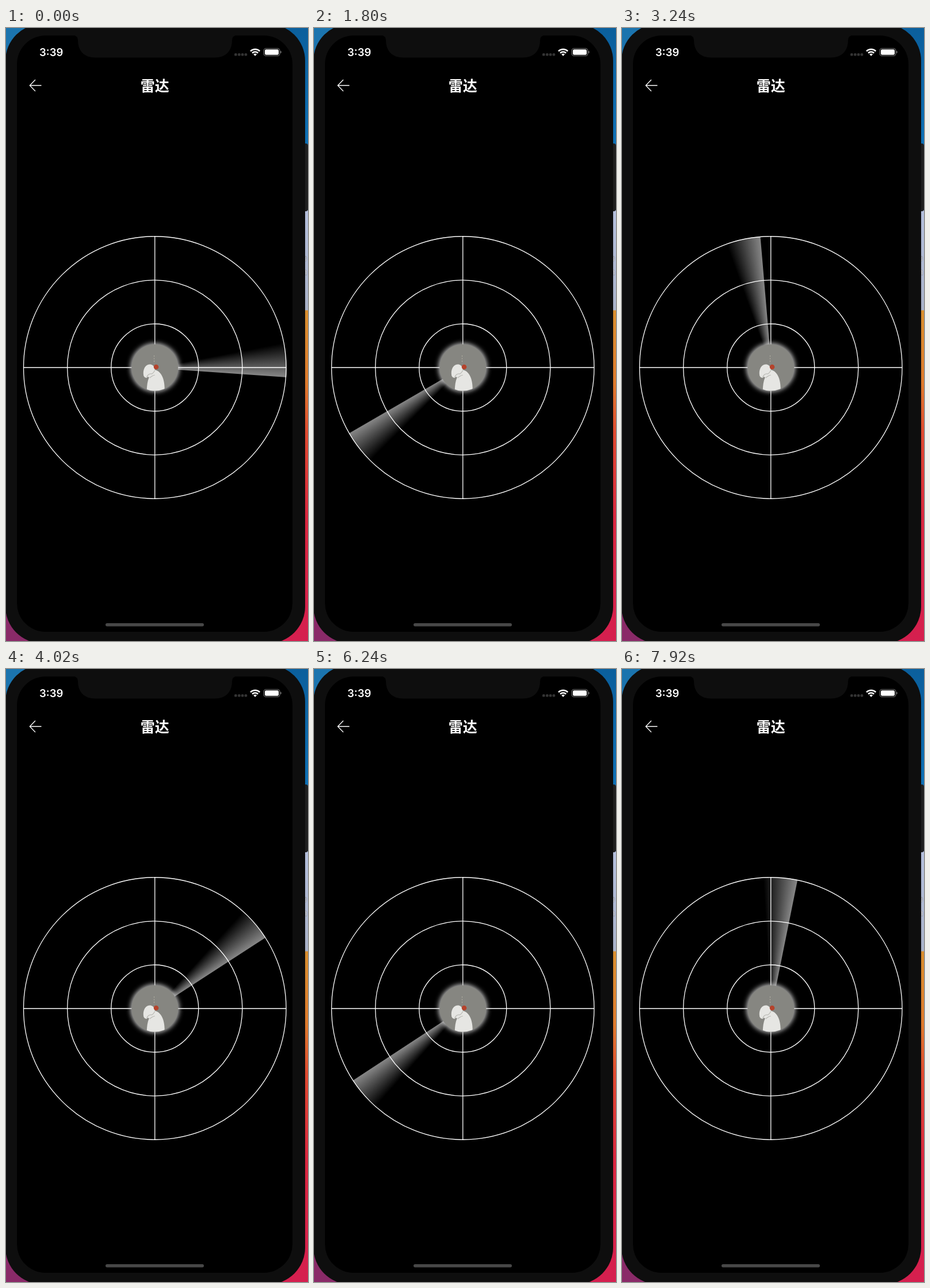
Animation of 525 by 1067 pixels, one loop 7.98 s. Source, as an HTML page:

```html
<!DOCTYPE html>
<html lang="zh-CN">
<head>
<meta charset="utf-8">
<title>雷达</title>
<style>
  html, body { margin: 0; width: 100%; height: 100%; overflow: hidden; background: #000; }
  .stage { position: relative; width: 525px; height: 1067px; overflow: hidden; }
  svg { position: absolute; left: 0; top: 0; }
  .clock { font: 600 18.5px Inter, sans-serif; }
  .title { font: 600 25px "Noto Sans CJK SC", "Noto Sans CJK", sans-serif; }
  .label { font: 500 15px Inter, sans-serif; }
  #beam {
    position: absolute; left: 30.5px; top: 362.75px; width: 456.5px; height: 456.5px;
    border-radius: 50%;
    background: conic-gradient(from 75deg, rgba(255,255,255,0) 0deg, rgba(255,255,255,.52) 15deg,
      rgba(255,255,255,0) 15.2deg, rgba(255,255,255,0) 360deg);
  }
</style>
</head>
<body>
<div class="stage">
  <svg width="525" height="1067" viewBox="0 0 525 1067">
    <defs>
      <linearGradient id="desk" x1="0" y1="0" x2="0" y2="1">
        <stop offset="0" stop-color="#0b5f9c"/>
        <stop offset=".18" stop-color="#0d6fb4"/>
        <stop offset=".297" stop-color="#0d6fb4"/>
        <stop offset=".297" stop-color="#b4bfdc"/>
        <stop offset=".46" stop-color="#a9b2c8"/>
        <stop offset=".461" stop-color="#d98f2f"/>
        <stop offset=".58" stop-color="#de7a2c"/>
        <stop offset=".66" stop-color="#df4a30"/>
        <stop offset=".8" stop-color="#d9263f"/>
        <stop offset="1" stop-color="#d51f4f"/>
      </linearGradient>
    </defs>

    <!-- desktop -->
    <rect width="525" height="1067" fill="url(#desk)"/>
    <rect width="80" height="80" fill="#1b74ae"/>
    <rect y="980" width="90" height="87" fill="#8a2a68"/>
    <g class="label" fill="#f4f4f4" stroke="#6d7284" stroke-width=".6">
      <text x="514.5" y="406">o</text>
      <text x="514.5" y="430">n</text>
    </g>

    <!-- phone -->
    <rect x="514" y="201" width="11" height="118" rx="4" fill="#1f1f1f"/>
    <rect x="-1" y="-7" width="521" height="1078" rx="64" fill="#0e0e0e"/>
    <rect x="19" y="13" width="479" height="1038" rx="50"/>
    <path d="M116 12.5Q125 13 125 21C125 40 136 51.5 155 51.5H363C382 51.5 393 40 393 21Q393 13 402 12.5Z" fill="#0e0e0e"/>
    <rect x="173" y="1036" width="171" height="5.5" rx="2.75" fill="#484848"/>

    <!-- status bar -->
    <text class="clock" x="58" y="49" fill="#fff">3:39</text>
    <g fill="#343434">
      <rect x="397" y="44" width="4.6" height="4.6" rx="1.5"/>
      <rect x="403" y="44" width="4.6" height="4.6" rx="1.5"/>
      <rect x="408.800" y="44" width="4.6" height="4.6" rx="1.5"/>
      <rect x="414.600" y="44" width="4.6" height="4.6" rx="1.5"/>
    </g>
    <g fill="none" stroke="#fff" stroke-width="2.5">
      <path d="M425 40.300A11.500 11.500 0 0 1 441.200 40.300"/>
      <path d="M428 43.700A7.200 7.200 0 0 1 438.200 43.700"/>
    </g>
    <path d="M430.200 45.800A4 4 0 0 1 436 45.800L433.100 48.800Z" fill="#fff"/>
    <rect x="448.200" y="35.500" width="27.600" height="13" rx="3.600" fill="none" stroke="#707070" stroke-width="1.200"/>
    <rect x="450" y="37.200" width="24" height="9.600" rx="2.200" fill="#fff"/>
    <path d="M477 39.800Q478.800 40.400 478.800 42T477 44.200Z" fill="#707070"/>

    <!-- navigation -->
    <path d="M61.500 100H41.500M51 90L41.300 100L51 110" fill="none" stroke="#fff" stroke-width="1.300"/>
    <text class="title" x="258.700" y="109.500" text-anchor="middle" fill="#fff">雷达</text>
  </svg>

  <div id="beam"></div>

  <svg width="525" height="1067" viewBox="0 0 525 1067">
    <defs>
      <filter id="blur" x="-40%" y="-40%" width="180%" height="180%">
        <feGaussianBlur stdDeviation="4"/>
      </filter>
      <clipPath id="face"><circle r="40.500"/></clipPath>
    </defs>
    <g transform="translate(258.750 591)">
      <g fill="none" stroke="#fff" stroke-width="1.300">
        <circle r="76"/>
        <circle r="152.100"/>
        <circle r="228.250"/>
        <path d="M-228.250 0H228.250M0-228.250V228.250"/>
      </g>
      <circle r="42" fill="#d0d0d0" filter="url(#blur)"/>
      <circle r="40.500" fill="#868681"/>
      <g clip-path="url(#face)">
        <path d="M-14 42C-14 32-13 24-10 17Q-13 15-14 18Q-20 18-20 10C-20-1-13-7-6-5Q-1-4 0 4C10 6 18 18 17 42Z" fill="#e6e6e3"/>
        <path d="M-14 17Q-12 10-5 11Q-2 9 0 5M-9 18Q-5 14 0 13" fill="none" stroke="#b9b9b4" stroke-width="1.200"/>
        <circle cx="2.300" cy="-1" r="4.300" fill="#b5432c"/>
        <path d="M-1.200-21V-7" stroke="#b8b3a6" stroke-width="1" stroke-dasharray="2 2.500"/>
      </g>
    </g>
  </svg>
</div>
<script>
  const LOOP = 7980, TICK = 60;
  // [ms, degrees clockwise from the right-hand axis]
  const sweep = [[0, 4], [1020, 86.9], [2520, 208], [4020, 327], [5220, 425.2],
                 [6240, 506.700], [7920, 641.4], [LOOP, 641.4]];
  const keys = sweep.map(([t, deg], i) => {
    const next = sweep[i + 1];
    return {
      offset: t / LOOP,
      transform: `rotate(${deg}deg)`,
      easing: next ? `steps(${(next[0] - t) / TICK}, end)` : 'linear'
    };
  });
  document.getElementById('beam').animate(keys, { duration: LOOP, iterations: Infinity });
</script>
</body>
</html>
```
